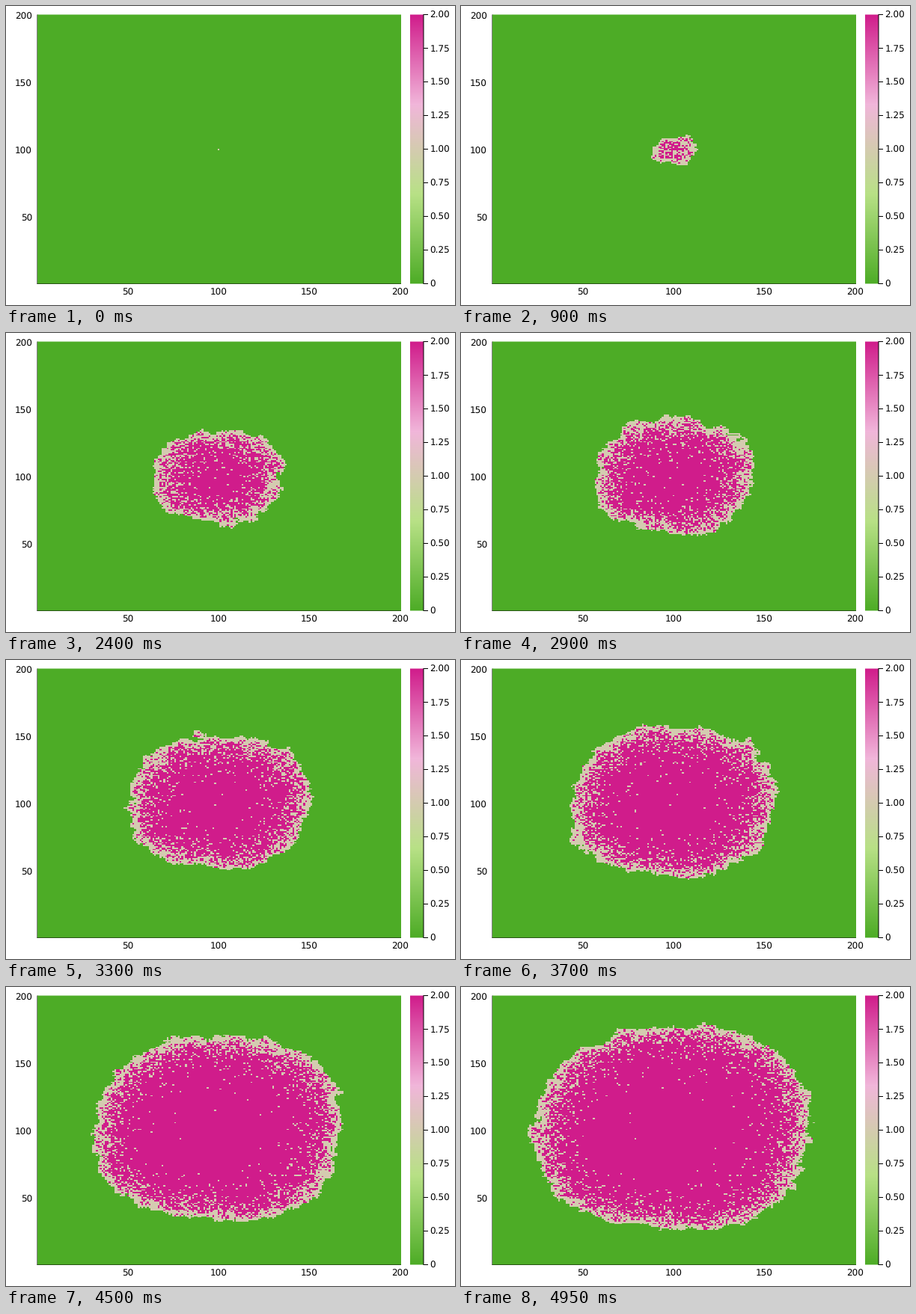
Animation of 600 by 400 pixels, one loop 5000 ms. Source, as a matplotlib script:

```python
import numpy as np
import matplotlib.pyplot as plt
from matplotlib.animation import FuncAnimation
from matplotlib.colors import LinearSegmentedColormap
from matplotlib.patches import Rectangle

plt.rcParams["text.hinting"] = "none"

W, H = 600, 400
N = 200
SEED = 99                       # index of the first infected cell
SPEED = 0.805                   # cells the front gains per step
RECOVERY = 0.1                  # chance to recover per step
LEFT, TOP, PLOT_W, PLOT_H = 42, 11.5, 486, 360
BOTTOM = TOP + PLOT_H
CELL_W, CELL_H = PLOT_W / N, PLOT_H / N
BAR_X, BAR_W = 540, 18
FRAMES, INTERVAL = 100, 50

# Bulges and dents of the front: direction in degrees, percent of radius
BULGES = {0: -2.5, 50: 5.5, 90: 0, 130: 2.7, 155: -1.8, 180: -1.8,
          215: 5, 262: -7, 300: 1.5, 330: 0, 347: -5}

rng = np.random.default_rng(7)


def shifts(field, reach):
    span = range(-reach, reach + 1)
    return [np.roll(field, (i, j), (0, 1)) for i in span for j in span]


def noise(reach):
    """Random field of unit variance, smooth over the given reach."""
    white = rng.normal(size=(N, N))
    return (2 * reach + 1) * np.mean(shifts(white, reach), axis=0)


def infection_steps():
    """Step at which the front reaches each cell."""
    y, x = np.mgrid[:N, :N] - SEED
    angle = np.degrees(np.arctan2(y, x))
    bulge = np.interp(angle, list(BULGES), list(BULGES.values()), period=360)
    t = (np.hypot(x, y) / (1 + bulge / 100) + 1) / SPEED
    t += 0.8 + 1.6 * noise(4) + 0.9 * noise(2) + 0.35 * noise(0)

    # no cell runs ahead of all its neighbours
    around = shifts(t, 1)
    del around[4]
    t = np.maximum(t, np.min(around, axis=0) + 0.5)
    t = np.maximum(np.ceil(t), 1)
    t[SEED, SEED] = 0
    return t


infected = infection_steps()
recovered = infected + rng.geometric(RECOVERY, (N, N))

cmap = LinearSegmentedColormap.from_list(
    "states", ["#4dac26", "#b8e186", "#f1b6da", "#d01c8b"], N=1024)
palette = cmap([0.0, 0.5, 1.0], bytes=True)[:, :3]

px = np.arange(LEFT, LEFT + PLOT_W)
py = np.arange(12, 371) + 0.5
cols = ((px - LEFT) / CELL_W).astype(int)
rows = N - 1 - ((py - TOP + 0.05) / CELL_H).astype(int)


def picture(step):
    state = (infected <= step).astype(int) + (recovered <= step)
    return palette[state[np.ix_(rows, cols)]]


fig = plt.figure(figsize=(W / 100, H / 100), dpi=100, facecolor="white")
ax = fig.add_axes([0, 0, 1, 1])
ax.axis("off")


def box(x, y, w, h, color="black", z=1):
    ax.add_patch(Rectangle((x, y), w, h, fc=color, lw=0, zorder=z,
                           snap=False))


def label(x, y, text, ha):
    ax.text(x, y, text, ha=ha, va="baseline", color="black",
            family="DejaVu Sans", fontsize=12 * 72 / 100)


def show(pixels, x, w):
    return ax.imshow(pixels, extent=(x, x + w, 371, 12),
                     interpolation="nearest", aspect="auto", zorder=0)


# axis lines lie under the heat map, which hides their inner half
box(LEFT - 0.5, TOP, 1, PLOT_H, z=-2)
box(LEFT - 0.5, BOTTOM - 0.5, PLOT_W + 0.5, 1, z=-2)
box(LEFT, TOP, PLOT_W, PLOT_H, cmap(0.0), z=-1)
heat = show(picture(0), LEFT, PLOT_W)

box(BAR_X, TOP, BAR_W, PLOT_H / 2, cmap(1.0), z=-1)
box(BAR_X, TOP + PLOT_H / 2, BAR_W, PLOT_H / 2, cmap(0.0), z=-1)
ramp = (BOTTOM - py) / PLOT_H
show(cmap(np.repeat(ramp[:, None], BAR_W, axis=1)), BAR_X, BAR_W)
box(BAR_X + BAR_W - 0.5, TOP - 0.5, 1, PLOT_H + 1)

ax.set_xlim(0, W)
ax.set_ylim(H, 0)

for v in (50, 100, 150, 200):
    label(LEFT + (v - 0.5) * CELL_W, 387, str(v), "center")
    label(35, BOTTOM - (v - 0.5) * CELL_H + 5, str(v), "right")

for i in range(9):
    y = BOTTOM - i * PLOT_H / 8
    box(BAR_X + BAR_W, y - 0.5, 6, 1)
    label(566.3, y + 4.7, f"{i / 4:.2f}" if i else "0", "left")


def update(frame):
    heat.set_data(picture(max(frame - 1, 0)))
    return [heat]


anim = FuncAnimation(fig, update, frames=FRAMES, interval=INTERVAL,
                     repeat=True, repeat_delay=0, blit=False)
plt.show()
```
